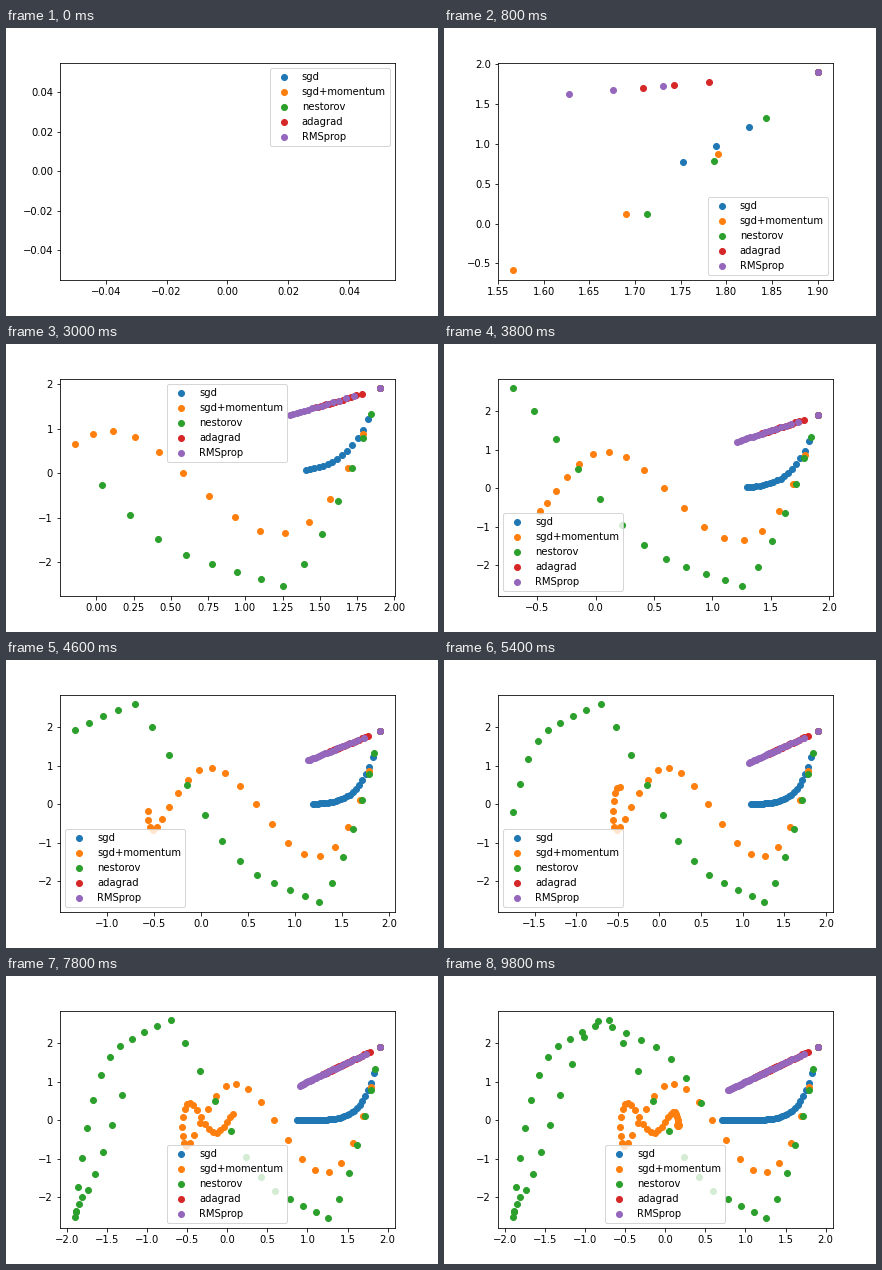
A matplotlib script that plays this animation: 432x288 px, repeating every 10000 ms.

```python
import numpy as np
import matplotlib.pyplot as plt
from matplotlib.animation import FuncAnimation

FRAMES = 50
START = np.array([1.9, 1.9])
BOUND = 2.0


def grad(p):
    """Gradient of 0.1 x^2 + y^2."""
    return np.array([0.2, 2.0]) * p


def sgd(p, state, lr=0.1):
    return p - lr * grad(p), state


def momentum(p, v, lr=0.1, mu=0.9):
    v = mu * v - lr * grad(p)
    return p + v, v


def nesterov(p, v, lr=0.05, mu=0.99):
    v = mu * v - lr * grad(p - mu * v)
    return p + v, v


def adagrad(p, cache, lr=0.07):
    g = grad(p)
    cache = cache + g ** 2
    return p - lr * g / np.sqrt(cache), cache


def rmsprop(p, cache, lr=0.01, decay=0.99):
    g = grad(p)
    cache = decay * cache + (1 - decay) * g ** 2
    return p - lr * g / np.sqrt(cache), cache


def trace(step):
    p, state = START, np.zeros(2)
    path = [p]
    for _ in range(FRAMES):
        # positions are recorded first, then pulled back into the domain
        p, state = step(p, state)
        path.append(p)
        p = np.clip(p, -BOUND, BOUND)
    # the first update is not plotted
    return np.delete(np.array(path), 1, axis=0)


PATHS = {
    "sgd": trace(sgd),
    "sgd+momentum": trace(momentum),
    "nestorov": trace(nesterov),
    "adagrad": trace(adagrad),
    "RMSprop": trace(rmsprop),
}

plt.rcParams["savefig.dpi"] = 72
fig, ax = plt.subplots(figsize=(6, 4), dpi=72)
fig.subplots_adjust(left=0.125, right=0.9, bottom=0.125, top=0.88)


def draw(k):
    ax.clear()
    for name, path in PATHS.items():
        ax.scatter(path[:k, 0], path[:k, 1], label=name)
    ax.legend(loc="best")


anim = FuncAnimation(fig, draw, frames=FRAMES, init_func=lambda: draw(0),
                     interval=200, repeat=True, repeat_delay=0)
plt.show()
```
